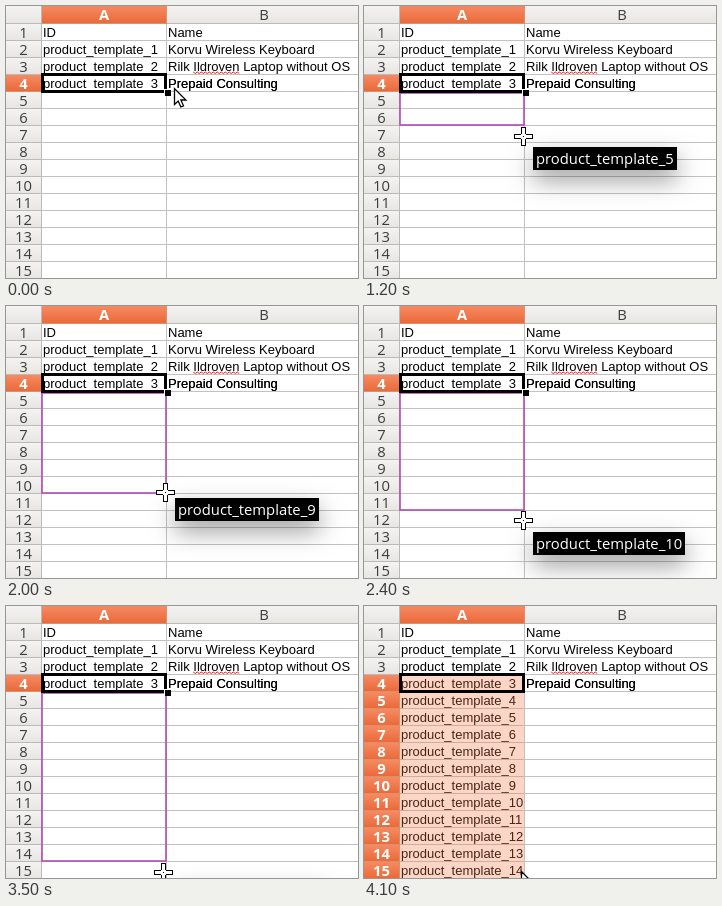
Recreate the animation shown at these times as an HTML page with a canvas. Size 352x272 px, loop 4200 ms.

```html
<!DOCTYPE html>
<html lang="en">
<head>
<meta charset="utf-8">
<title>Spreadsheet fill handle</title>
<style>
html, body { margin: 0; width: 100%; height: 100%; overflow: hidden; background: #fff; }
canvas { display: block; width: 352px; height: 272px; }
</style>
</head>
<body>
<canvas id="sheet" width="352" height="272"></canvas>
<script>
const ctx = document.getElementById('sheet').getContext('2d');
const W = 352, H = 272, LOOP = 4200, STEP = 100;
const ROW = 17, LEFT = 36, MID = 161, LAST = 15, ACTIVE = 4;
const PRESS = 300, RELEASE = 3700;
const CELL = '13px "Liberation Sans", Arial, sans-serif';
const UI = '14.8px "Open Sans", "Noto Sans", sans-serif';
const names = ['Name', 'Korvu Wireless Keyboard', 'Rilk Ildroven Laptop without OS', 'Prepaid Consulting'];

// time, pointer x, pointer y
const path = [
  [0, 168, 82], [300, 163, 87], [500, 162, 89], [800, 160, 102], [1600, 158, 158],
  [2400, 159, 214], [2900, 161, 245], [3500, 157, 266], [3600, 157, 268],
  [3800, 157, 265], [4200, 157, 265]
];

function pointerAt(t) {
  const i = path.findIndex((p, k) => k > 0 && t <= p[0]);
  const [a, b] = [path[i - 1], path[i]];
  const f = (t - a[0]) / (b[0] - a[0]);
  return [1, 2].map(k => Math.round(a[k] + (b[k] - a[k]) * f));
}

function box(x, y, w, h, color) {
  ctx.fillStyle = color;
  ctx.fillRect(x, y, w, h);
}

function text(s, x, y, font, color, align = 'left') {
  ctx.font = font;
  ctx.fillStyle = color;
  ctx.textAlign = align;
  ctx.fillText(s, x, y);
}

function header(label, x, y, w, h, base, on) {
  const g = ctx.createLinearGradient(0, y, 0, y + h);
  g.addColorStop(0, on ? '#f58a62' : '#f4f3f1');
  g.addColorStop(1, on ? '#ea6a3a' : '#e8e6e3');
  box(x, y, w, h, g);
  box(x, y + h, w + 1, 1, on ? '#d9906f' : '#bcbab7');
  box(x + w, y, 1, h + 1, on ? '#d9906f' : '#bcbab7');
  text(label, x + w / 2, base, (on ? 'bold ' : '') + UI, on ? '#fff' : '#3c3c3c', 'center');
}

function squiggle(x, y, w) {
  ctx.beginPath();
  for (let i = 0; i <= w; i += 2) ctx.lineTo(x + i, y + (i % 4 ? 1.5 : 0));
  ctx.strokeStyle = '#e02020';
  ctx.lineWidth = 1;
  ctx.stroke();
}

function grid(filled) {
  box(0, 0, W, H, '#fff');
  for (let n = 1; n <= LAST; n++) box(LEFT, ROW * n + ROW, W, 1, '#c2c2c2');
  box(MID - 1, ROW, 1, H, '#c2c2c2');
  if (filled) box(LEFT, ROW * ACTIVE, MID - LEFT - 1, H, 'rgba(240,119,70,.3)');

  for (let n = 1; n <= LAST; n++) {
    const y = ROW * n + 14;
    if (n <= ACTIVE || filled) {
      const tinted = filled && n >= ACTIVE;
      text(n === 1 ? 'ID' : 'product_template_' + (n - 1), 37, y, CELL, tinted ? '#4a2416' : '#000');
    }
    if (names[n - 1]) text(names[n - 1], 162, y, CELL, '#000');
  }
  ctx.font = CELL;
  squiggle(162 + ctx.measureText('Rilk ').width, 66, ctx.measureText('Ildroven').width);

  header('', 0, 0, LEFT - 1, ROW, 0, false);
  header('A', LEFT, 0, MID - LEFT - 1, ROW, 14, true);
  header('B', MID, 0, 194, ROW, 14, false);
  for (let n = 1; n <= LAST; n++) {
    header(n, 0, ROW * n + 1, LEFT - 1, ROW - 1, ROW * n + 15, n === ACTIVE || filled && n > ACTIVE);
  }
}

function activeCell(handle) {
  ctx.strokeStyle = '#000';
  ctx.lineWidth = 3;
  ctx.strokeRect(36.5, 68.5, 123, 17);
  if (handle) {
    box(158, 83, 7, 7, '#fff');
    box(159, 84, 6, 6, '#000');
  }
}

function fillRange(row) {
  ctx.strokeStyle = '#b04cb4';
  ctx.lineWidth = 1.6;
  ctx.strokeRect(36, 87, 124, ROW * row + ROW - 87);
}

function tip(label, y) {
  ctx.font = UI;
  const w = Math.round(ctx.measureText(label).width) + 6;
  ctx.save();
  ctx.shadowColor = 'rgba(0,0,0,.4)';
  ctx.shadowBlur = 24;
  ctx.shadowOffsetY = 10;
  box(169, y, w, 23, '#000');
  ctx.restore();
  text(label, 172, y + 17, UI, '#fff');
}

function cross(x, y) {
  for (let i = 0; i < 4; i++) {
    ctx.save();
    ctx.translate(x + .5, y + .5);
    ctx.rotate(i * Math.PI / 2);
    box(-2.5, -9.5, 5, 7, '#000');
    box(-1.5, -8.5, 3, 6, '#fff');
    ctx.restore();
  }
  box(x - 2, y - 2, 5, 5, '#fff');
  box(x, y, 1, 1, '#000');
}

function arrow(x, y) {
  ctx.save();
  ctx.translate(x + .5, y + .5);
  const shape = new Path2D('M0 0V16L3.7 12.5L6.3 18.5L9 17.3L6.4 11.5H11.4Z');
  ctx.fillStyle = '#fff';
  ctx.fill(shape);
  ctx.strokeStyle = '#000';
  ctx.lineWidth = 1.3;
  ctx.stroke(shape);
  ctx.restore();
}

function draw(t) {
  const [x, y] = pointerAt(t);
  const filled = t >= RELEASE;
  const row = Math.floor((y - 14) / ROW);
  grid(filled);
  if (!filled && row > ACTIVE) fillRange(row);
  activeCell(!filled);
  text(names[3], 162, ROW * ACTIVE + 14, CELL, '#000');
  if (!filled && row > ACTIVE) {
    const tipRow = Math.floor((y - 9) / ROW);
    tip('product_template_' + (row - 1), 22 + ROW * tipRow);
  }
  if (t < PRESS || filled) arrow(x, y);
  else cross(x, y);
}

const start = performance.now();
function tick() {
  const t = (performance.now() - start) % LOOP;
  draw(Math.floor(t / STEP) * STEP);
  requestAnimationFrame(tick);
}
tick();
</script>
</body>
</html>
```
